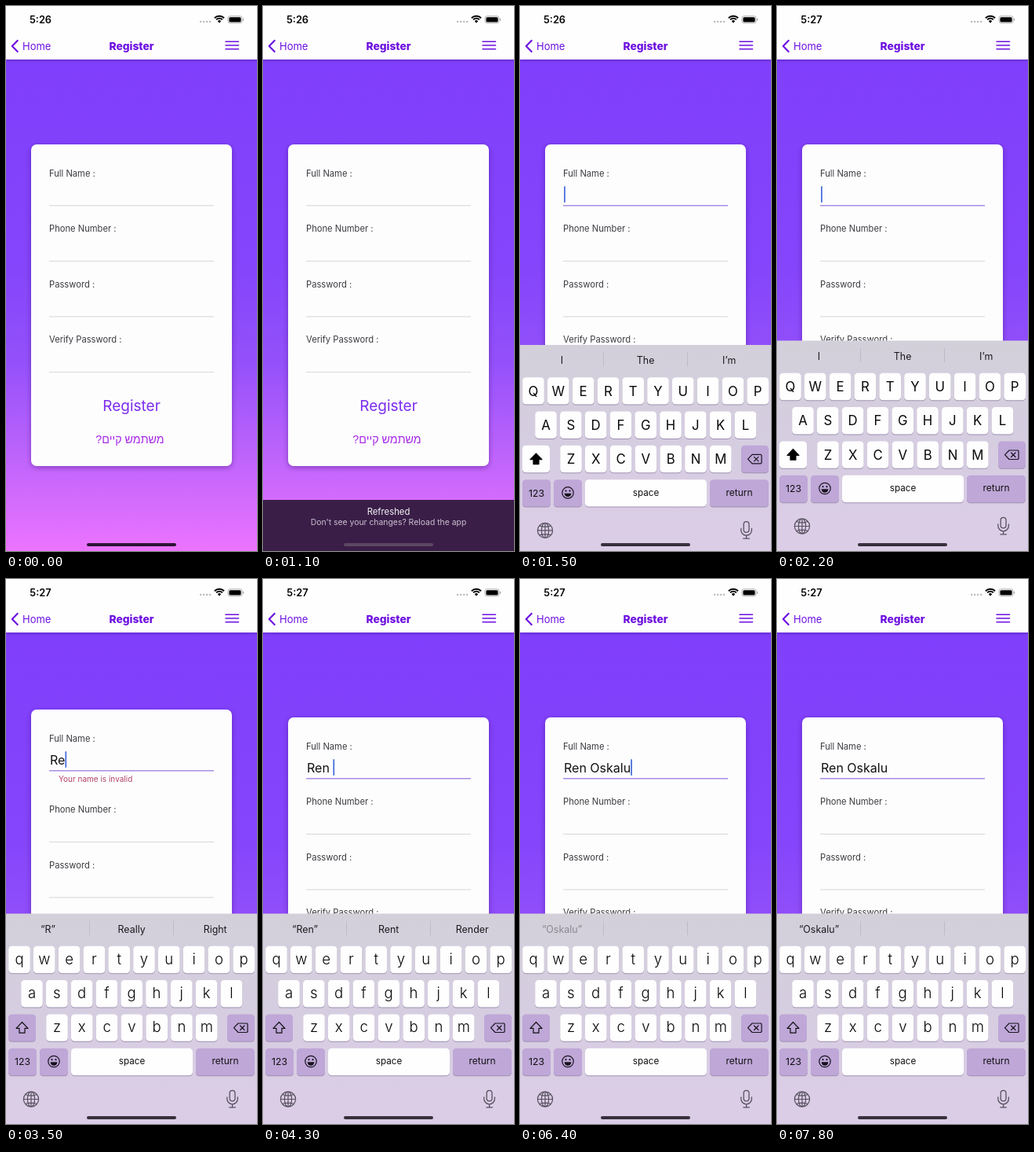
Recreate the animation shown at these times as an HTML page with a canvas. Size 320 by 693 pixels, loop 8 s.

```html
<!DOCTYPE html>
<html lang="en">
<head>
<meta charset="utf-8">
<title>Register form</title>
<style>
  html, body { margin: 0; width: 100%; height: 100%; overflow: hidden; background: #fff; }
  canvas { display: block; width: 320px; height: 693px; }
</style>
</head>
<body>
<canvas id="stage"></canvas>
<script>
const W = 320, H = 693, LOOP = 8000;
const canvas = document.getElementById('stage');
const ratio = window.devicePixelRatio || 1;
canvas.width = Math.round(W * ratio);
canvas.height = Math.round(H * ratio);
const ctx = canvas.getContext('2d');

const SANS = 'Inter, "Open Sans", sans-serif';
const PURPLE = '#6d10e0', KEY_TINT = '#bfa7d8';
const FOCUS_AT = 1200, CLOCK_AT = 2000, KEYBOARD_AT = 1182;

const NAME = 'Ren Oskalu';
const TYPED_AT = [2750, 3430, 3900, 4300, 4800, 5130, 5360, 5650, 5900, 6200];

const SUGGESTIONS = [
  [0, 'I', 'The', 'I’m'],
  [2880, '“R”', 'Really', 'Right'],
  [3600, '“Re”', 'Ready', 'Read'],
  [4050, '“Ren”', 'Rent', 'Render'],
  [4420, 'is', 'and', 'was'],
  [4920, '“O”', 'On', 'Of'],
  [5220, '“Os”', 'Overall', 'Ove'],
  [5520, '“Osk”', 'Ask', 'Oak'],
  [5780, '“Oska”', '', ''],
  [6050, '“Oskal”', '', ''],
  [6330, '“Oskalu”', '', '']
];

const clamp = v => Math.max(0, Math.min(1, v));
const ramp = (t, start, length) => clamp((t - start) / length);

function gradient(y0, y1, stops) {
  const g = ctx.createLinearGradient(0, y0, 0, y1);
  for (const [y, color] of stops) g.addColorStop((y - y0) / (y1 - y0), color);
  return g;
}

// y is the middle of the capitals
function text(str, x, y, size, color, align = 'left', weight = 400, family = SANS) {
  ctx.font = `${weight} ${size}px ${family}`;
  ctx.textAlign = align;
  ctx.fillStyle = color;
  ctx.fillText(str, x, y + size * 0.364);
}

function box(x, y, w, h, r, color) {
  ctx.fillStyle = color;
  ctx.beginPath();
  ctx.roundRect(x, y, w, h, r);
  ctx.fill();
}

function shadowed(blur, dy, color, draw) {
  ctx.save();
  ctx.shadowColor = color;
  ctx.shadowBlur = blur * ratio;
  ctx.shadowOffsetY = dy * ratio;
  draw();
  ctx.restore();
}

function stroke(color, width, trace) {
  ctx.strokeStyle = color;
  ctx.lineWidth = width;
  ctx.beginPath();
  trace();
  ctx.stroke();
}

function polyline(points, close) {
  points.forEach(([x, y], i) => i ? ctx.lineTo(x, y) : ctx.moveTo(x, y));
  if (close) ctx.closePath();
}

function circle(x, y, r, color) {
  ctx.fillStyle = color;
  ctx.beginPath();
  ctx.arc(x, y, r, 0, Math.PI * 2);
  ctx.fill();
}

function drawBackground() {
  ctx.fillStyle = gradient(68, H, [
    [68, '#803ffc'], [330, '#8445fb'], [450, '#9350fa'], [560, '#b962fb'], [H, '#ec74ff']
  ]);
  ctx.fillRect(0, 0, W, H);
}

function drawHeader(t) {
  shadowed(4, 1, 'rgba(30,0,80,.35)', () => box(0, 0, W, 68, 0, '#fefefe'));
  text(t < CLOCK_AT ? '5:26' : '5:27', 44, 17.5, 12.8, '#050505', 'center', 600);

  for (let i = 0; i < 4; i++) circle(248.2 + i * 4, 20, 1.2, '#b9b9b9');

  ctx.lineCap = 'butt';
  for (const r of [8.6, 5.5])
    stroke('#000', 2, () => ctx.arc(272, 21.3, r, -Math.PI * 0.75, -Math.PI * 0.25));
  ctx.fillStyle = '#000';
  ctx.beginPath();
  ctx.moveTo(272, 21.8);
  ctx.arc(272, 21.3, 3, -Math.PI * 0.75, -Math.PI * 0.25);
  ctx.fill();

  stroke('#a8a8a8', 0.9, () => ctx.roundRect(283, 12.8, 18, 9, 2.6));
  box(284.4, 14.2, 15.2, 6.2, 1.5, '#000');
  box(302, 15.8, 1.2, 3, 0.6, '#a8a8a8');

  ctx.lineCap = ctx.lineJoin = 'round';
  stroke(PURPLE, 2.2, () => polyline([[14.7, 44], [7.8, 51], [14.7, 58]]));
  text('Home', 21, 51.5, 13, PURPLE);
  text('Register', 160, 51, 13.8, PURPLE, 'center', 800);
  for (const y of [45.3, 50, 54.7])
    stroke(PURPLE, 1.5, () => polyline([[280, y], [296.5, y]]));
}

function caretAlpha(t, typed) {
  if (t < FOCUS_AT) return 0;
  const phase = (t - (typed ? TYPED_AT[typed - 1] : FOCUS_AT)) % 1000;
  return 1 - ramp(phase, 450, 150) + ramp(phase, 900, 100);
}

function drawForm(t) {
  const typed = TYPED_AT.filter(at => at <= t).length;
  const invalid = typed > 0 && typed < 3;
  const shift = invalid ? 10 : 0;

  shadowed(7, 2, 'rgba(40,0,100,.4)', () =>
    box(32, 176 - shift, 256, 409 + shift * 2, 7, '#fdfdfe'));

  ['Full Name :', 'Phone Number :', 'Password :', 'Verify Password :'].forEach((label, i) => {
    const y = 212.5 + i * 70.6 + (i ? shift : -shift);
    const focused = i === 0 && t >= FOCUS_AT;
    text(label, 55, y, 11.2, '#3c3c40');
    ctx.fillStyle = focused ? '#9673dc' : '#dcdce0';
    ctx.fillRect(55, y + 40.7, 210, 1.2);
  });

  const value = NAME.slice(0, typed);
  text(value, 56, 240.3 - shift, 16, '#111');
  const caretX = 56 + ctx.measureText(value).width;
  ctx.globalAlpha = caretAlpha(t, typed);
  box(caretX, 229 - shift, 1.8, 21, 0.9, '#4a6fdc');
  ctx.globalAlpha = 1;

  if (invalid) text('Your name is invalid', 67, 254.5, 10, '#b24468');
  text('Register', 160, 508 + shift, 19, '#7c2cee', 'center');
  ctx.direction = 'rtl';
  text('משתמש קיים?', 158, 550.5 + shift, 14.3, '#a626e6', 'center', 400,
    '"Liberation Sans", "DejaVu Sans", sans-serif');
  ctx.direction = 'ltr';
}

function drawBanner(t) {
  const alpha = ramp(t, 50, 120) * (1 - ramp(t, 1090, 250));
  if (!alpha) return;
  ctx.globalAlpha = alpha;
  box(0, 628, W, 65, 0, '#341b40');
  text('Refreshed', 160, 643, 11.3, '#fff', 'center');
  text('Don\'t see your changes? Reload the app', 160, 656.5, 10.4, '#d0c8d4', 'center');
  ctx.globalAlpha = 1;
}

function drawKey(x, y, w, color = '#fefefe') {
  box(x, y - 16.2, w, 34.4, 4.5, 'rgba(90,70,115,.45)');
  box(x, y - 17.2, w, 34.4, 4.5, color);
}

function drawLetters(upper) {
  [['qwertyuiop', 17, 484], ['asdfghjkl', 33, 527.3], ['zxcvbnm', 65, 570.6]].forEach(([row, x0, y]) => {
    [...row].forEach((letter, i) => {
      const x = x0 + i * 31.8;
      drawKey(x - 13.8, y, 27.6);
      if (upper) text(letter.toUpperCase(), x, y, 16.8, '#080808', 'center');
      else text(letter, x, y - 1, 18.6, '#080808', 'center', 300);
    });
  });
}

function drawSuggestions(t) {
  let index = 0;
  while (index + 1 < SUGGESTIONS.length && SUGGESTIONS[index + 1][0] <= t) index++;
  const [start, ...words] = SUGGESTIONS[index];
  ctx.globalAlpha = index ? ramp(t, start, 180) : 1;
  words.forEach((word, i) => text(word, 53.5 + i * 106.6, 445.5, 12.4, '#1b1a1f', 'center'));
  ctx.globalAlpha = 1;
  ctx.fillStyle = '#bdb8c8';
  for (const x of [106, 213]) ctx.fillRect(x, 435, 0.9, 18);
}

function drawShift(upper) {
  drawKey(3, 570.6, 35, upper ? '#fefefe' : KEY_TINT);
  const arrow = () => polyline([
    [20.5, 563.5], [28, 571.3], [24, 571.3], [24, 577.2], [17, 577.2], [17, 571.3], [13, 571.3]
  ], true);
  stroke('#101010', 1.2, arrow);
  if (upper) {
    ctx.fillStyle = '#000';
    ctx.fill();
  }
}

function drawSpecialKeys() {
  drawKey(282, 570.6, 35, KEY_TINT);
  stroke('#18141d', 1.2, () => {
    polyline([[296, 565], [307, 565], [308, 566], [308, 575.5], [307, 576.5], [296, 576.5], [290.5, 570.7]], true);
    polyline([[298.5, 568], [304, 573.5]]);
    polyline([[304, 568], [298.5, 573.5]]);
  });

  drawKey(3, 614, 36, KEY_TINT);
  text('123', 21, 613.8, 12.3, '#111', 'center');

  drawKey(43, 614, 36, KEY_TINT);
  stroke('#17121d', 1.2, () => ctx.arc(61, 613.5, 7.2, 0, Math.PI * 2));
  circle(58.5, 611.2, 1.1, '#17121d');
  circle(63.5, 611.2, 1.1, '#17121d');
  ctx.beginPath();
  ctx.arc(61, 614.3, 4.4, 0, Math.PI);
  ctx.closePath();
  ctx.fill();

  drawKey(83, 614, 155);
  text('space', 160.5, 613, 11.7, '#111', 'center');
  drawKey(242, 614, 75, KEY_TINT);
  text('return', 279.5, 613, 12, '#111', 'center');
}

function drawBottomIcons() {
  const color = '#57515f';
  stroke(color, 1.2, () => {
    ctx.arc(32, 661.5, 9.6, 0, Math.PI * 2);
    ctx.moveTo(36.6, 661.5);
    ctx.ellipse(32, 661.5, 4.6, 9.6, 0, 0, Math.PI * 2);
    polyline([[32, 652], [32, 671]]);
    polyline([[22.5, 661.5], [41.5, 661.5]]);
    for (const side of [-1, 1]) {
      ctx.moveTo(24.6, 661.5 + side * 6);
      ctx.quadraticCurveTo(32, 661.5 + side * 3.4, 39.4, 661.5 + side * 6);
    }
  });
  stroke(color, 1.3, () => {
    ctx.roundRect(285.2, 650.3, 6.8, 13.6, 3.4);
    ctx.moveTo(281.8, 659);
    ctx.lineTo(281.8, 661);
    ctx.arc(288.6, 661, 6.8, Math.PI, 0, true);
    ctx.lineTo(295.4, 659);
    polyline([[288.6, 668], [288.6, 671.5]]);
    polyline([[284.8, 671.8], [292.4, 671.8]]);
  });
}

function drawKeyboard(t) {
  if (t < KEYBOARD_AT) return;
  const s = (t - KEYBOARD_AT) / 1000 * 18.26;
  const upper = t < TYPED_AT[0];
  ctx.save();
  ctx.translate(0, 268 * Math.exp(-s) * (1 + s));
  box(0, 425.5, W, 290, 0, gradient(425, H, [[425, '#d3d0da'], [540, '#d5cde0'], [H, '#dccde7']]));
  drawSuggestions(t);
  drawLetters(upper);
  drawShift(upper);
  drawSpecialKeys();
  drawBottomIcons();
  ctx.restore();
}

function drawHomeIndicator(t) {
  const dimmed = t >= 100 && t < 1250;
  box(103, 683, 114, 4, 2, dimmed ? '#5b4864' : t < 1250 ? '#2b1433' : '#37303d');
}

function render(t) {
  ctx.setTransform(ratio, 0, 0, ratio, 0, 0);
  drawBackground();
  drawForm(t);
  drawHeader(t);
  drawBanner(t);
  drawKeyboard(t);
  drawHomeIndicator(t);
}

const startTime = performance.now();
function tick() {
  render((performance.now() - startTime) % LOOP);
  requestAnimationFrame(tick);
}
tick();
</script>
</body>
</html>
```
